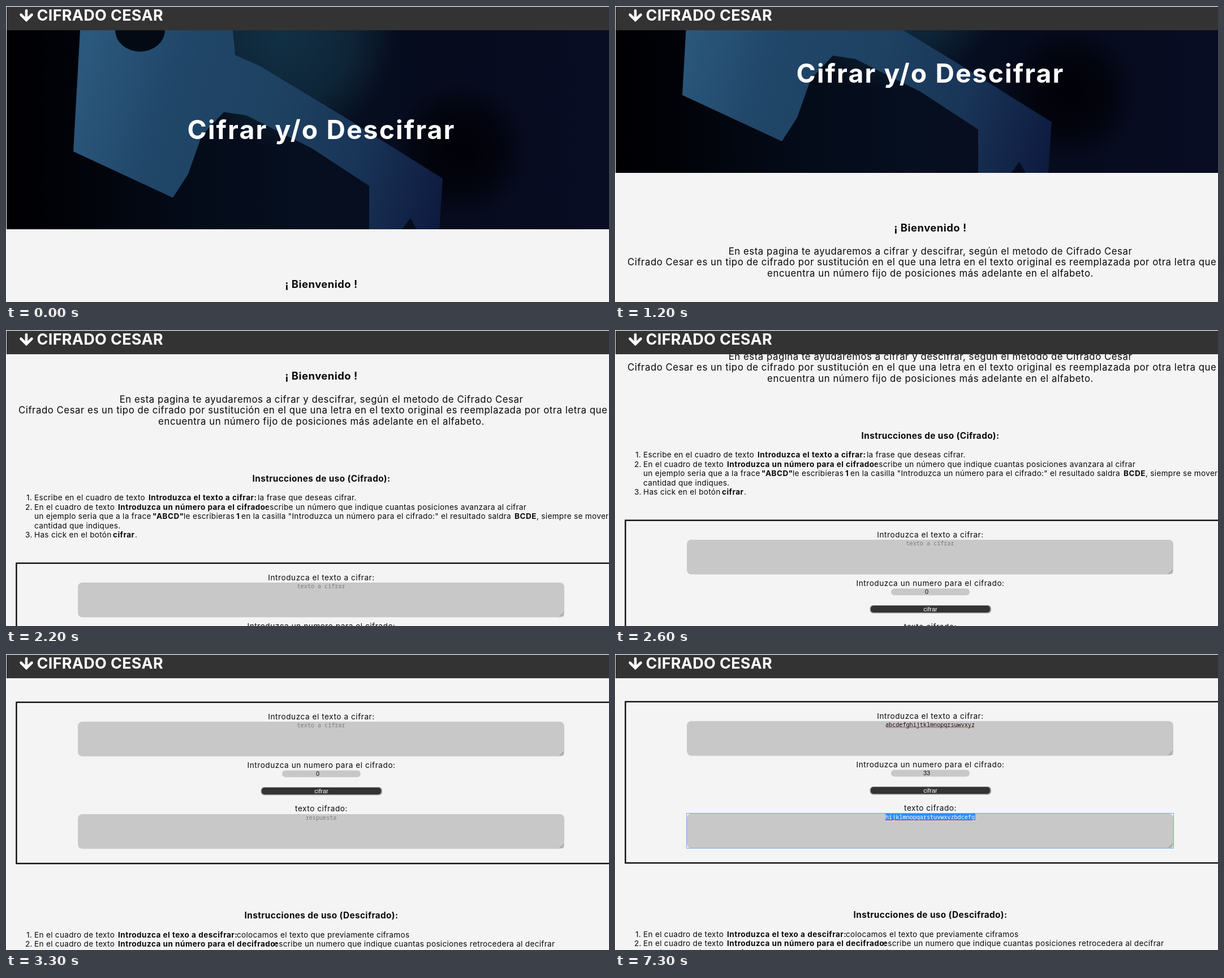
Write an HTML page with a canvas that moves like this. It is 1066 by 525 pixels and loops after 8000 ms.

```html
<!DOCTYPE html>
<html lang="es">
<head>
<meta charset="utf-8">
<title>Cifrado Cesar</title>
<style>
html, body { margin: 0; width: 100%; height: 100%; overflow: hidden; background: #f4f4f4; }
canvas { display: block; }
</style>
</head>
<body>
<canvas id="stage" width="1066" height="525"></canvas>
<script>
const W = 1066, H = 525, LOOP = 8000, MID = 557.5;
const ctx = document.getElementById('stage').getContext('2d');

// [font, letter spacing]
const SANS = 'Inter, sans-serif';
const STYLE = {
  logo:  [`bold 27px ${SANS}`, 0.3],
  hero:  [`bold 46.3px ${SANS}`, 2.1],
  hello: [`bold 18.5px ${SANS}`, 0.45],
  head:  [`bold 15.3px ${SANS}`, 0.4],
  para:  [`16.8px ${SANS}`, 0.53],
  label: [`13.6px ${SANS}`, 0.55],
  body:  [`13.6px ${SANS}`, 0.3],
  bold:  [`bold 13.5px ${SANS}`, 0.5],
  mono:  ['10.13px "Noto Sans Mono", monospace', 0],
  field: ['11px "Liberation Sans", sans-serif', 0]
};

// Scroll offset from each moment on
const SCROLL = [
  [0, 0], [900, 12], [1000, 55], [1100, 82], [1200, 100], [1300, 148], [1400, 165],
  [1600, 212], [1700, 247], [1900, 266], [2000, 322], [2100, 388], [2200, 412],
  [2500, 430], [2600, 488], [2700, 548], [2800, 612], [2900, 652], [3000, 659],
  [3200, 706], [3300, 740], [3400, 741]
];

const PLAIN = 'abcdefghijtklmnopqrsuwvxyz';
const KEY = 33;
const cipher = [...PLAIN]
  .map(c => String.fromCharCode(97 + (c.charCodeAt(0) - 97 + KEY) % 26)).join('');

function text(str, x, y, style, color = '#0a0a0a', align = 'left') {
  [ctx.font, ctx.letterSpacing] = [STYLE[style][0], STYLE[style][1] + 'px'];
  ctx.textAlign = align;
  ctx.fillStyle = color;
  ctx.fillText(str, x, y);
}
const centered = (str, y, style, color) => text(str, MID, y, style, color, 'center');

function rect(x, y, w, h, color) {
  ctx.fillStyle = color;
  ctx.fillRect(x, y, w, h);
}

function rounded(x, y, w, h, r, color) {
  ctx.fillStyle = color;
  ctx.beginPath();
  ctx.roundRect(x, y, w, h, r);
  ctx.fill();
}

function line(points, color, width) {
  ctx.strokeStyle = color;
  ctx.lineWidth = width;
  ctx.beginPath();
  points.forEach(([x, y]) => ctx.lineTo(x, y));
  ctx.stroke();
}

function shape(points, fill) {
  ctx.fillStyle = fill;
  ctx.beginPath();
  points.forEach(([x, y]) => ctx.lineTo(x, y));
  ctx.fill();
}

function ring(x, y, w, h) {
  ctx.strokeStyle = '#74a5ea';
  ctx.lineWidth = 1;
  ctx.strokeRect(x + 0.5, y + 0.5, w - 1, h - 1);
}

function gradient(g, ...stops) {
  stops.forEach(([at, color]) => g.addColorStop(at, color));
  return g;
}

function glow(x, y, r, color) {
  const g = gradient(ctx.createRadialGradient(x, y, 0, x, y, r),
    [0, color], [0.6, color + 'aa'], [1, color + '00']);
  rect(x - r, y - r, 2 * r, 2 * r, g);
}

function hero() {
  ctx.save();
  ctx.beginPath();
  ctx.rect(1, 43, W - 1, 353);
  ctx.clip();
  rect(0, 43, W, 353, gradient(ctx.createLinearGradient(0, 0, W, 0),
    [0, '#000002'], [0.09, '#010207'], [0.3, '#040b18'], [0.5, '#060f20'],
    [0.75, '#060b1e'], [1, '#080d24']));
  glow(490, 50, 200, '#123044');
  glow(805, 255, 120, '#010107');
  shape([[131, 43], [401, 43], [405, 87], [448, 106], [600, 198], [772, 306], [766, 396],
    [726, 396], [715, 376], [700, 396], [642, 396], [642, 319], [540, 252], [425, 194],
    [385, 188], [346, 230], [322, 298], [295, 340], [119, 258]],
    gradient(ctx.createLinearGradient(120, 150, 770, 350),
      [0, '#2b587d'], [0.25, '#204668'], [0.5, '#1e4262'], [0.75, '#193557'], [1, '#0e1b40']));
  ctx.fillStyle = '#040a14';
  ctx.beginPath();
  ctx.ellipse(237, 43, 44, 38, 0, 0, 7);
  ctx.fill();
  ctx.restore();
  centered('Cifrar y/o Descifrar', 236, 'hero', '#fff');
}

// Each row is a run of [x, text, style]
function list(rows, y) {
  rows.forEach((row, i) => row.forEach(([x, str, style = 'body']) =>
    text(str, x, y + i * 16.5, style)));
}

const CIPHER_STEPS = [
  [[36, '1.'], [50, 'Escribe en el cuadro de texto'], [252, 'Introduzca el texto a cifrar:', 'bold'],
    [445, 'la frase que deseas cifrar.']],
  [[34, '2.'], [50, 'En el cuadro de texto'], [198, 'Introduzca un número para el cifrado:', 'bold'],
    [458, 'escribe un número que indique cuantas posiciones avanzara al cifrar']],
  [[50, 'un ejemplo seria que a la frace'], [259, '"ABCD"', 'bold'], [314, 'le escribieras'],
    [407, '1', 'bold'], [416, 'en la casilla "Introduzca un número para el cifrado:" el resultado saldra'],
    [899, 'BCDE', 'bold'], [938, ', siempre se moverá la']],
  [[50, 'cantidad que indiques.']],
  [[34, '3.'], [50, 'Has cick en el botón'], [189, 'cifrar', 'bold'], [228, '.']]
];

const DECIPHER_STEPS = [
  [[36, '1.'], [50, 'En el cuadro de texto'], [198, 'Introduzca el texo a descifrar:', 'bold'],
    [408, 'colocamos el texto que previamente ciframos']],
  [[34, '2.'], [50, 'En el cuadro de texto'], [198, 'Introduzca un número para el decifrado:', 'bold'],
    [474, 'escribe un numero que indique cuantas posiciones retrocedera al decifrar']],
  [[50, 'un ejemplo seria que a la frase "BCDE" le escribieras 1 en la casilla "Introduzca un número para el decifrado:" el resultado saldra ABCD, al']]
];

function squiggle(y) {
  const points = [];
  for (let x = 479; x <= 635; x += 1.5) points.push([x, y + (points.length % 2 ? 0.6 : -0.6)]);
  line(points, '#e03030', 1);
}

function textarea(y, { value, hint, focus, caret, selected, misspelt }) {
  rounded(127, y, 860, 61.5, 8, '#c8c8c8');
  line([[979, y + 60.5], [986, y + 53.5]], '#666', 0.9);
  line([[983, y + 60.5], [986, y + 57.5]], '#666', 0.9);
  if (focus) ring(126, y - 1, 862, 63);
  if (selected) rect(478, y, 159, 12, '#2f8cff');
  text(value || hint, 557, y + 10, 'mono', selected ? '#fff' : value ? '#111' : '#7d7d7d', 'center');
  if (misspelt) squiggle(y + 11);
  if (caret) rect(value ? 635 : 557, y, 1, 12, '#000');
}

function numberField({ value, focus, spinner, selected, caret }) {
  const y = 946.5;
  rounded(488, y, 139, 12, focus ? 0 : 6, '#c8c8c8');
  if (spinner) {
    rect(615, y, 11, 12, '#f0f0f0');
    shape([[617.5, y + 4.5], [620.5, y + 1.5], [623.5, y + 4.5]], '#444');
    shape([[617.5, y + 7.5], [620.5, y + 10.5], [623.5, y + 7.5]], '#444');
  }
  if (focus) ring(487, y - 0.5, 141, 13);
  if (selected) rect(547.5, y, 7, 12, '#2f8cff');
  text(value, 551, 956.3, 'field', selected ? '#fff' : '#111', 'center');
  if (caret) rect(551 + value.length * 3, y + 0.5, 1, 11, '#000');
}

function button(focus) {
  if (focus) ring(449, 974, 217, 18);
  rounded(450.5, 976, 214.5, 14.5, 6, '#9a9a9a');
  rounded(452, 977, 211, 12, 5, '#333');
  centered('cifrar', 987, 'field', '#fff');
}

function form(t) {
  const between = (a, b) => t >= a && t < b;
  ctx.strokeStyle = '#0a0a0a';
  ctx.lineWidth = 2.4;
  ctx.strokeRect(18.4, 825.6, 1100, 286);

  centered('Introduzca el texto a cifrar:', 856, 'label');
  textarea(860, {
    value: t >= 4700 ? PLAIN : '',
    hint: 'texto a cifrar',
    focus: between(3600, 5400),
    caret: between(3600, 4100) || between(4600, 5200),
    misspelt: t >= 4800
  });

  centered('Introduzca un numero para el cifrado:', 942, 'label');
  numberField({
    value: t < 6100 ? '0' : t < 6300 ? '3' : String(KEY),
    focus: between(5400, 6700),
    spinner: between(5100, 6700),
    selected: between(5500, 6100),
    caret: between(5400, 5500) || between(6100, 6700)
  });

  button(between(6700, 7200));

  centered('texto cifrado:', 1019, 'label');
  textarea(1024, {
    value: t >= 6700 ? cipher : '',
    hint: 'respuesta',
    focus: t >= 7200,
    selected: t >= 7300,
    misspelt: t >= 7200
  });
}

function header() {
  rect(0, 0, W, 43, '#f0f0f0');
  rect(1, 1.3, W - 1, 41.7, '#333');
  ctx.lineCap = 'round';
  line([[36, 8], [36, 23]], '#fff', 4.6);
  line([[26.5, 15.5], [36, 25], [45.5, 15.5]], '#fff', 4.6);
  ctx.lineCap = 'butt';
  text('CIFRADO CESAR', 54.5, 26, 'logo', '#fff');
}

function draw(t) {
  const scroll = SCROLL.findLast(([at]) => t >= at)[1];
  rect(0, 0, W, H, '#f4f4f4');
  ctx.save();
  ctx.translate(0, -scroll);
  hero();
  centered('¡ Bienvenido !', 500, 'hello');
  centered('En esta pagina te ayudaremos a cifrar y descifrar, según el metodo de Cifrado Cesar', 540.5, 'para');
  text('Cifrado Cesar es un tipo de cifrado por sustitución en el que una letra en el texto original es reemplazada por otra letra que se', 22, 560, 'para');
  centered('encuentra un número fijo de posiciones más adelante en el alfabeto.', 580, 'para');
  centered('Instrucciones de uso (Cifrado):', 681, 'head');
  list(CIPHER_STEPS, 714);
  form(t);
  centered('Instrucciones de uso (Descifrado):', 1209, 'head');
  list(DECIPHER_STEPS, 1242.5);
  ctx.restore();
  rect(0, 43, 1, H, '#fff');
  header();
}

const start = performance.now();
function tick() {
  draw((performance.now() - start) % LOOP);
  requestAnimationFrame(tick);
}
tick();
</script>
</body>
</html>
```
